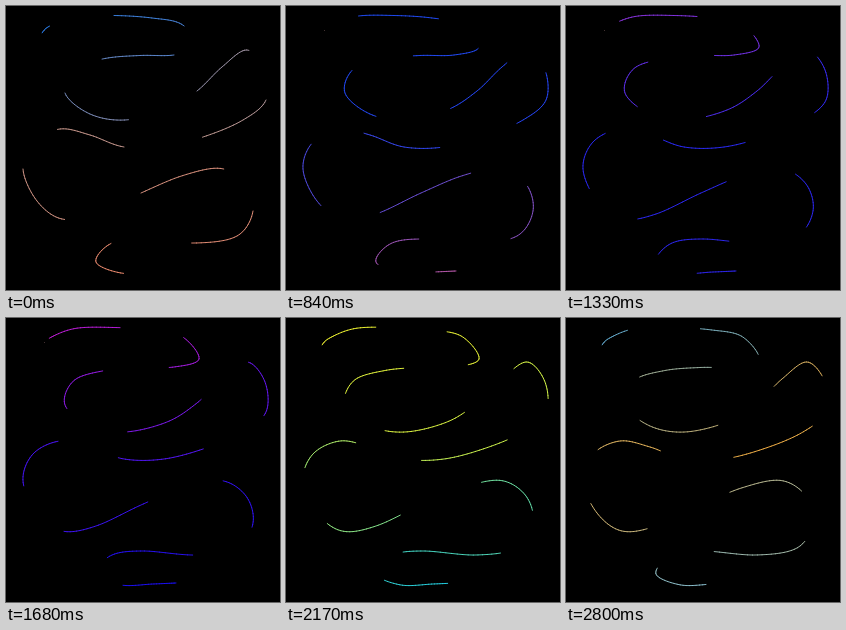
Write an HTML page with a canvas that moves like this. It is 274 by 284 pixels and loops after 2870 ms.

```html
<!DOCTYPE html>
<html lang="en">
<head>
<meta charset="utf-8">
<title>Flowing dashes</title>
<style>
  html, body { margin: 0; width: 100%; height: 100%; overflow: hidden; background: #000; }
  canvas { display: block; }
</style>
</head>
<body>
<canvas id="stage" width="274" height="284"></canvas>
<script>
const ctx = document.getElementById('stage').getContext('2d');
const STEP = 70, STEPS = 41;
const PER_DASH = 4;           // scribble points per dash and gap
const DUTY = 0.522;           // share of a period that is drawn
const FIRST = 0.37, LAST = 11;

// Key points of the scribble, evenly spaced in pen time; one sweep per line.
const points = `
  34,31 42,21 69,10.5 108,9.5 146,12 176,18.5 193,41
  168,49 134,49.5 99,52.5 68,62.5
  59,87 84,108 119,114 161,104 191,85 216,61 241,44 259,64
  260,94 237,114 200,130 158,141 118,141 84,129 54,123 27,136
  17,163 31,195 56,213 90,208 135,187 177,169.5 215,162.5 240,178
  247,205 231,230 190,237 137,233
  105,237.5 90,256 115,267 147,266 170,265
`.trim().split(/\s+/).map(p => p.split(',').map(Number));

// step: colours at the start, middle and end of the scribble
const colours = Object.entries({
  0: '1e82ff c8a098 ff9070',
  8: '1a6cff 6060e8 ff7a68',
  12: '2050ff 2848ff c05cb0',
  19: 'a038e8 2c2cff 3028f8',
  24: 'd820e0 5a18ff 1a10ff',
  31: 'ffff30 d8ff50 20d8f0',
  40: '58b4e8 ffb848 88c8e0'
}).map(([at, stops]) => ({
  at: +at,
  stops: stops.split(' ').map(h => [0, 2, 4].map(i => parseInt(h.slice(i, i + 2), 16)))
}));

const mix = (a, b, f) => a.map((v, i) => v + (b[i] - v) * f);
const clamp = (v, lo, hi) => Math.min(hi, Math.max(lo, v));
const knot = i => points[clamp(i, 0, points.length - 1)];

// Catmull-Rom curve through the key points
function pointAt(u) {
  const s = u * PER_DASH - 1, i = Math.floor(s), t = s - i;
  const [a, b, c, d] = [i - 1, i, i + 1, i + 2].map(knot);
  return b.map((v, n) => v + t / 2 * (c[n] - a[n]
    + t * (2 * a[n] - 5 * v + 4 * c[n] - d[n]
    + t * (3 * (v - c[n]) + d[n] - a[n]))));
}

// The dashes start slowly, then run evenly.
const phaseAt = step => 0.0218 * step * step / (step + 2);

function stopsAt(step) {
  const i = Math.max(1, colours.findIndex(c => c.at >= step));
  const a = colours[i - 1], b = colours[i], f = (step - a.at) / (b.at - a.at);
  return a.stops.map((c, n) => mix(c, b.stops[n], f));
}

function colourAt(stops, u) {
  const p = u / LAST * 2, i = p < 1 ? 0 : 1;
  return `rgb(${mix(stops[i], stops[i + 1], p - i).map(Math.round)})`;
}

function drawDash(from, to, stops) {
  const n = Math.ceil((to - from) / 0.025);
  let p = pointAt(from);
  for (let i = 1; i <= n; i++) {
    const u = from + (to - from) * i / n, q = pointAt(u);
    ctx.strokeStyle = colourAt(stops, u);
    ctx.beginPath();
    ctx.moveTo(...p);
    ctx.lineTo(...q);
    ctx.stroke();
    p = q;
  }
}

function draw(now) {
  const step = Math.floor(now / STEP) % STEPS;
  const phase = phaseAt(step), stops = stopsAt(step);
  ctx.fillStyle = '#000';
  ctx.fillRect(0, 0, 274, 284);
  ctx.fillStyle = '#403030';
  ctx.fillRect(38, 24, 1, 1);
  ctx.lineWidth = 0.9;
  ctx.lineCap = 'round';
  for (let k = 0; k <= LAST; k++) {
    const from = Math.max(FIRST, k - phase), to = Math.min(LAST, k - phase + DUTY);
    if (to > from) drawDash(from, to, stops);
  }
}

const start = performance.now();
function tick() {
  draw(performance.now() - start);
  requestAnimationFrame(tick);
}
tick();
</script>
</body>
</html>
```
